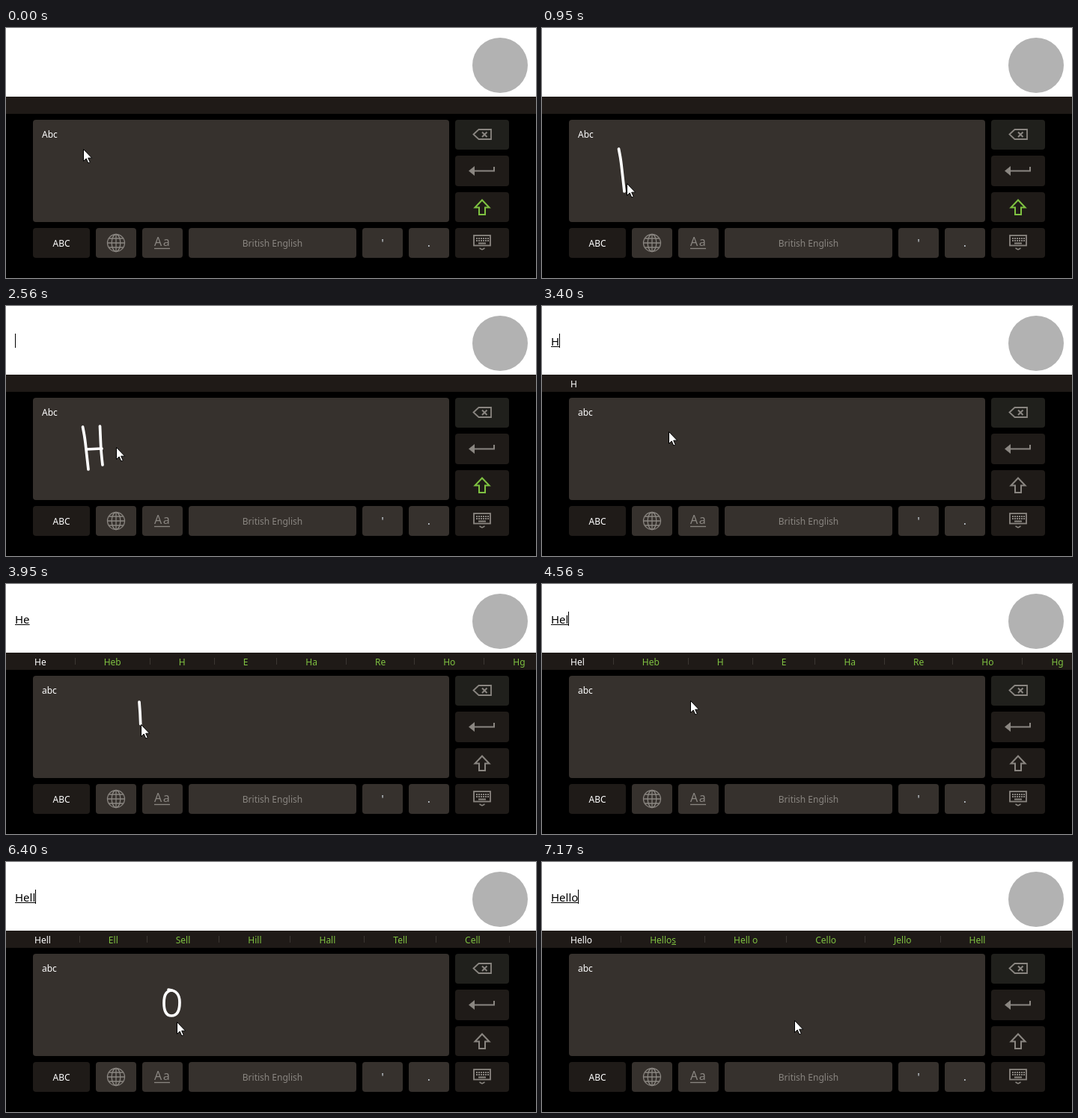
Write an HTML page that moves like this. It is 708 px wide and 335 px high and loops after 7670 ms.

```html
<!DOCTYPE html>
<html lang="en">
<head>
<meta charset="utf-8">
<title>Handwriting keyboard</title>
<style>
html, body { margin: 0; width: 100%; height: 100%; overflow: hidden; background: #fff; }
#stage { position: relative; width: 708px; height: 335px; overflow: hidden; font: 12px "Noto Sans", sans-serif; }
svg { position: absolute; left: 0; top: 0; }
#typed { position: absolute; left: 12px; top: 37px; height: 20px; font-size: 15px; line-height: 20px; color: #000; white-space: pre; }
#word { text-decoration: underline; }
#caret { position: absolute; left: 100%; top: 0; width: 1px; height: 19px; background: #000; }
#bar { position: absolute; left: 0; top: 93px; width: 708px; height: 22px; overflow: hidden; display: flex; line-height: 23px; color: #7fc241; }
#bar span { flex: none; position: relative; padding: 0 38px; margin-right: 1px; white-space: pre; }
#bar span:first-child { color: #fff; }
#bar span:not(:last-child)::after { content: ""; position: absolute; right: -1px; top: 6px; width: 1px; height: 9px; background: #3b3632; }
.icon { fill: none; stroke: #8a8681; stroke-width: 2; }
.ink { fill: none; stroke: #fff; stroke-width: 3.7; stroke-linecap: round; stroke-linejoin: round; }
</style>
</head>
<body>
<div id="stage">
  <svg width="708" height="335" font-family="Noto Sans, sans-serif" font-size="12">
    <rect y="92" width="708" height="23" fill="#1f1a17"/>
    <rect y="115" width="708" height="220"/>
    <circle cx="660" cy="50" r="37" fill="#b2b2b2"/>
    <g id="keys"></g>
    <text id="mode" x="48" y="147" fill="#fff"></text>
    <g text-anchor="middle">
      <text x="74" y="293" fill="#fff">ABC</text>
      <text x="356" y="293" fill="#8a8681">British English</text>
      <text x="503" y="293" fill="#dfe9f2" font-size="14">'</text>
      <text x="565" y="293" fill="#dfe9f2" font-size="14">.</text>
    </g>
    <text x="198" y="292" fill="#8a8681" font-size="16" font-weight="500" letter-spacing="1.5">Aa</text>
    <g class="icon">
      <path d="M198 295.5h21" stroke-width="1.3"/>
      <g stroke-width="1.3">
        <circle cx="147" cy="288" r="11.5"/>
        <ellipse cx="147" cy="288" rx="5.8" ry="11.5"/>
        <path d="M147 276.5v23M135.5 288h23M137.5 282h19M137.5 294h19"/>
      </g>
      <path d="M624.5 142.5l7-6.5h16.5v13h-16.5z" stroke-width="1.8"/>
      <path d="M636 139.500l6.500 6.500m0-6.500l-6.500 6.500"/>
      <path d="M624 191.500h28v-5.500"/>
      <path d="M618 191.500l8-6.500v13z" fill="#8a8681" stroke="none"/>
      <path id="shift" d="M636 230.500l-9.500 10h5.500v9.500h8v-9.500h5.500z"/>
      <rect x="625" y="278" width="22" height="13.500" stroke-width="1.800"/>
      <path d="M628 282h17M628 285h17" stroke-dasharray="2 1"/>
      <path d="M631 288.500h10"/>
      <path d="M632.500 295l3.500 2 3.500-2" stroke-width="1.500"/>
    </g>
    <g id="inks"></g>
  </svg>
  <div id="typed"><span id="word"></span><i id="caret"></i></div>
  <div id="bar"></div>
  <svg width="708" height="335">
    <path id="cursor" d="M.5.5v16l3.700-3.500 2.600 6 2.500-1.100-2.600-5.700h5z" fill="#fff" stroke="#000"/>
  </svg>
</div>
<script>
const LOOP = 7670;
const $ = id => document.getElementById(id);

function svg(parent, tag, attrs) {
  const el = document.createElementNS('http://www.w3.org/2000/svg', tag);
  for (const k in attrs) el.setAttribute(k, attrs[k]);
  return parent.appendChild(el);
}

const DARK = '#1f1b18', LIGHT = '#36312d';
const key = (x, y, width, height, fill) => svg($('keys'), 'rect', { x, y, width, height, fill, rx: 4 });
key(36, 123, 556, 137, LIGHT);
key(36, 268, 76, 40, DARK);
for (const [x, w] of [[120, 54], [182, 54], [244, 224], [476, 54], [538, 54]]) key(x, 268, w, 40, LIGHT);
key(600, 123, 72, 40, '#20201c');
key(600, 171, 72, 41, DARK);
key(600, 220, 72, 40, DARK);
key(600, 268, 72, 40, DARK);

// Pen strokes: path, start, end, time the ink is wiped
const strokes = [
  ['M102.500 162Q105 174 106 183T110 219', 480, 860, 2640],
  ['M125.500 161Q126 172 126.500 184T129 213', 1180, 1420, 2640],
  ['M108 192L128 191', 1510, 1680, 2640],
  ['M146 190L164 187C164 174 146 172 146 189C146 207 158 207 166 202', 2720, 3150, 3330],
  ['M178 158Q180 180 180 205', 3760, 4060, 4420],
  ['M198 156Q200 182 200 211', 4640, 4950, 5400],
  ['M222 172C213 172 211 180 211 189C211 200 214 206 221 206C229 206 232 198 232 188C232 178 228 172 217 171', 5620, 6130, 6560]
].map(([d, start, end, wipe]) => {
  const el = svg($('inks'), 'path', { d, class: 'ink' });
  return { el, start, end, wipe, len: el.getTotalLength() };
});

// Cursor stops between the strokes
const stops = [[0, 103, 162], [450, 103, 162], [1980, 154, 184], [3400, 169, 168], [3580, 174, 160],
  [4560, 198, 156], [5420, 224, 178], [5500, 224, 178], [6400, 228, 214], [6500, 250, 222],
  [6770, 337, 212], [LOOP, 337, 212]];
for (const s of strokes) {
  for (const [t, at] of [[s.start, 0], [s.end, s.len]]) {
    const p = s.el.getPointAtLength(at);
    stops.push([t, p.x, p.y]);
  }
}
stops.sort((a, b) => a[0] - b[0]);

const words = [[0, ''], [2700, 'H'], [3480, 'He'], [4500, 'Hel'], [5540, 'Hell'], [6640, 'Hello']];

// Suggestions lag behind the word; a trailing "|" keeps the last divider
const hints = [
  [0, ''],
  [3940, 'Heb|H|E|Ha|Re|Ho|Hg|'],
  [4960, 'Hel<u>l</u>|Hel<u>d</u>|He l|He|Eel|Hal|'],
  [5990, 'Ell|Sell|Hill|Hall|Tell|Cell|'],
  [7110, 'Hello<u>s</u>|Hell o|Cello|Jello|Hell']
];

const latest = (list, t) => list.filter(e => e[0] <= t).pop()[1];

function cursorAt(t) {
  const s = strokes.find(s => t >= s.start && t <= s.end);
  if (s) {
    const p = s.el.getPointAtLength(s.len * (t - s.start) / (s.end - s.start));
    return [p.x, p.y];
  }
  const i = stops.findIndex(p => p[0] > t);
  const [t0, x0, y0] = stops[i - 1], [t1, x1, y1] = stops[i];
  const u = (t - t0) / (t1 - t0), k = u * u * (3 - 2 * u);
  return [x0 + (x1 - x0) * k, y0 + (y1 - y0) * k];
}

const caretOn = t => t >= 6350 ? t < 7050 || t >= 7170 : t >= 110 && (t - 110) % 1040 < 520;

let shown;
function render(t) {
  for (const { el, start, end, wipe, len } of strokes) {
    const u = Math.min(1, (t - start) / (end - start));
    el.style.display = u > 0 && t < wipe ? '' : 'none';
    el.style.strokeDasharray = u < 1 ? `${Math.max(0, u) * len} ${len + 9}` : 'none';
  }
  const [x, y] = cursorAt(t).map(Math.round);
  $('cursor').setAttribute('transform', `translate(${x} ${y})`);
  $('caret').style.visibility = caretOn(t) ? 'visible' : 'hidden';

  const word = latest(words, t), hint = latest(hints, t);
  if (shown === word + hint) return;
  shown = word + hint;
  $('word').textContent = word;
  $('mode').textContent = word ? 'abc' : 'Abc';
  $('shift').style.stroke = word ? '' : '#7fc241';
  const items = hint ? [word, ...hint.split('|')] : [word];
  $('bar').innerHTML = items.map(s => `<span>${s}</span>`).join('');
}

const began = performance.now();
function tick() {
  render((performance.now() - began) % LOOP);
  requestAnimationFrame(tick);
}
tick();
</script>
</body>
</html>
```
